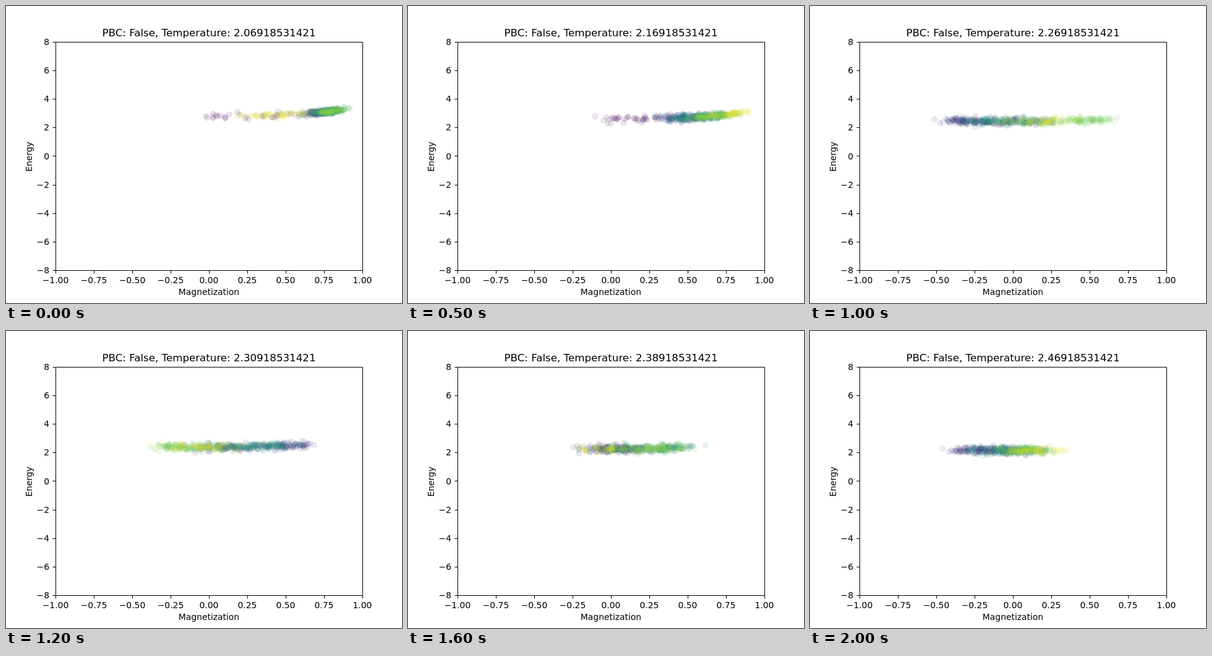
Recreate the animation shown at these times as an HTML page. Size 640 by 480 pixels, loop 2100 ms.

```html
<!DOCTYPE html>
<html lang="en">
<head>
<meta charset="utf-8">
<style>
html, body { margin: 0; width: 100%; height: 100%; overflow: hidden; background: #fff; }
svg { display: block; width: 640px; height: 480px; font: 13.89px "DejaVu Sans", sans-serif; }
#dots { fill-opacity: .1; stroke-opacity: .1; stroke-width: 1.39; }
#axes { fill: none; stroke: #000; }
</style>
</head>
<body>
<svg viewBox="0 0 640 480">
  <g id="dots"></g>
  <path id="axes"/>
  <g id="labels"></g>
  <text id="title" x="328" y="49" text-anchor="middle" font-size="16.67"></text>
  <text x="328" y="467" text-anchor="middle">Magnetization</text>
  <text transform="translate(42 243.5) rotate(-90)" text-anchor="middle">Energy</text>
</svg>
<script>
const FRAMES = 21, STEP = 100, COUNT = 500, CRITICAL = 10;
const $ = id => document.getElementById(id);
const { sin, exp, max, min, floor, round } = Math;
const px = m => 328 + 248 * m;
const py = e => 242.4 - 23.1 * e;

const viridis = [[68, 1, 84], [59, 82, 139], [33, 145, 140], [94, 201, 98], [253, 231, 37]];

function color(t) {
  const p = t * 4, i = min(3, floor(p));
  return `rgb(${viridis[i].map((c, j) => round(c + (viridis[i + 1][j] - c) * (p - i)))})`;
}

function randomizer(seed) {
  return () => {
    seed = seed + 0x6D2B79F5 | 0;
    let r = Math.imul(seed ^ seed >>> 15, 1 | seed);
    r = r + Math.imul(r ^ r >>> 7, 61 | r) ^ r;
    return ((r ^ r >>> 14) >>> 0) / 4294967296;
  };
}

// Mean magnetization at simulation time t (0..1): ordered below the critical step, wandering above
function meanMagnetization(n, t) {
  const order = 1 - min(1, n / CRITICAL) ** 2;
  const well = n % 6 === 2 ? -1 : 1;
  const spread = .6 - .52 * order - .032 * max(0, n - CRITICAL);
  const wander = .65 * sin(Math.PI * t + 1.25 * n - 1.5) + .45 * sin(17 * t + 2 * n);
  const warmup = 1 - exp(-((t / .05) ** 2));
  const dip = 1 - .6 * max(0, -sin(5 * t + n)) ** 20;
  return (.77 * well * order + spread * wander) * warmup * dip;
}

function dots(n) {
  const rnd = randomizer(n * 977 + 5);
  const bell = () => (rnd() + rnd() + rnd() + rnd() - 2) * 1.73;
  const base = 2.8 - .04 * n + .00033 * n * n;
  let out = '';
  for (let i = 0; i < COUNT; i++) {
    const t = i / (COUNT - 1), mean = meanMagnetization(n, t);
    const m = mean + bell() * (.015 + .075 * (1 - mean * mean));
    const e = base + .2 * m * m + .5 * m ** 4 + bell() * .14 * (1 - .6 * m * m);
    const c = color(t);
    out += `<circle cx="${px(m).toFixed(2)}" cy="${py(e).toFixed(2)}" r="4.17" fill="${c}" stroke="${c}"/>`;
  }
  return out;
}

function drawAxes() {
  const snap = v => round(v) + .5;
  let path = 'M80.5 58.5H576.5V427.5H80.5Z', text = '';
  const label = (x, y, anchor, s) =>
    text += `<text x="${x}" y="${y}" text-anchor="${anchor}">${s.replace('-', '\u2212')}</text>`;
  for (let i = 0; i <= 8; i++) {
    const m = -1 + i / 4, e = -8 + 2 * i;
    path += `M${snap(px(m))} 427.5v5M80.5 ${snap(py(e))}h-5`;
    label(px(m), 448, 'middle', m.toFixed(2));
    label(70, round(py(e) + 5.2), 'end', String(e));
  }
  $('axes').setAttribute('d', path);
  $('labels').innerHTML = text;
}

let shown = -1;
function draw(now) {
  const n = floor(now / STEP) % FRAMES;
  if (n !== shown) {
    shown = n;
    $('dots').innerHTML = dots(n);
    $('title').textContent = `PBC: False, Temperature: ${(2.06918531421 + .02 * n).toFixed(11)}`;
  }
  requestAnimationFrame(draw);
}

drawAxes();
draw(performance.now());
</script>
</body>
</html>
```
